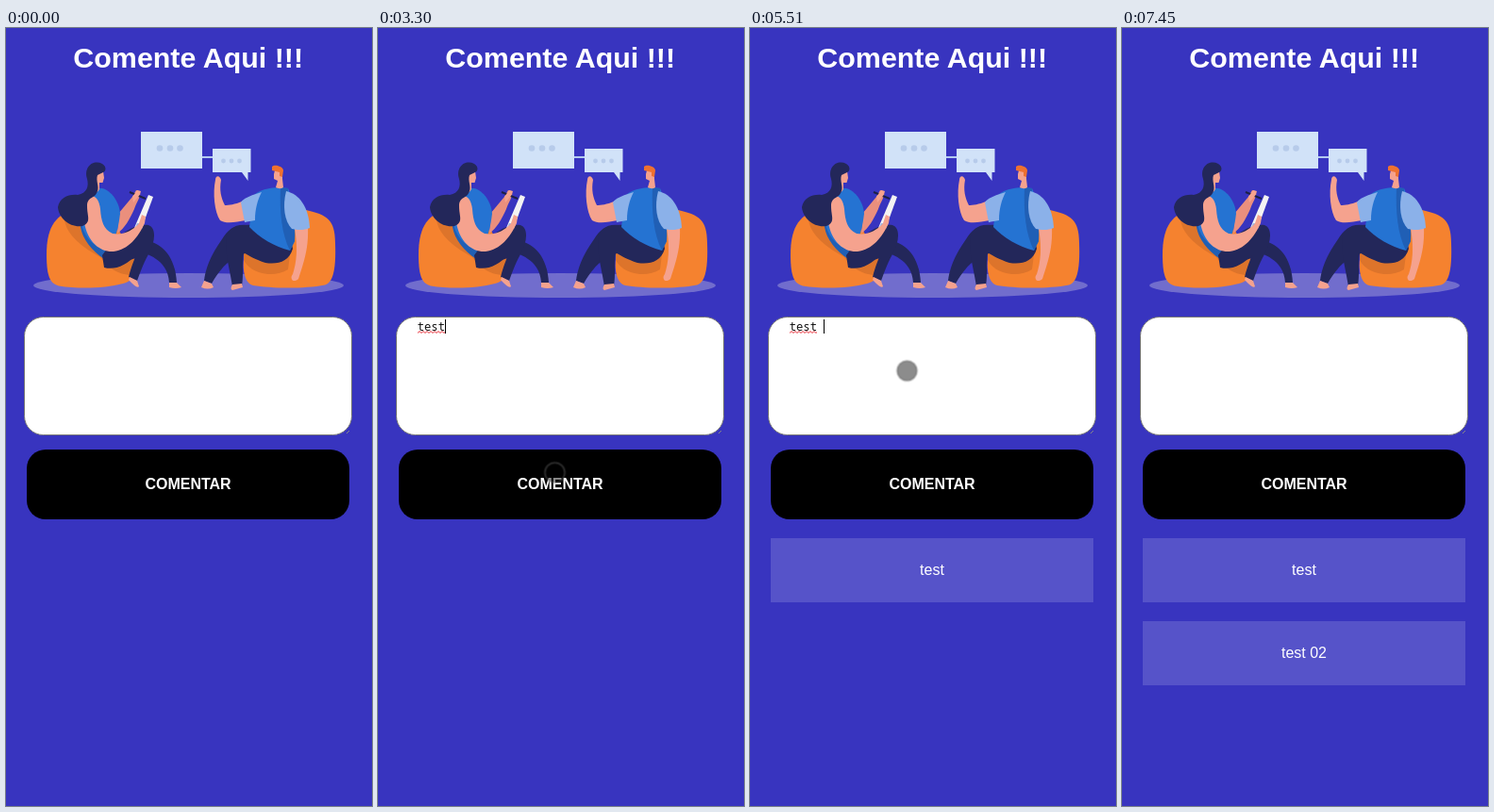
These frames come from a looping animation (388 by 825 pixels, 8.18 s). An HTML page:

```html
<!DOCTYPE html>
<html lang="pt">
<head>
<meta charset="utf-8">
<title>Comente Aqui</title>
<style>
html, body { margin: 0; width: 100%; height: 100%; overflow: hidden; background: #3834bf; }
svg { position: absolute; left: 0; top: 0; display: block; }
svg text { font-family: "Liberation Sans", Arial, sans-serif; font-size: 16px; fill: #fff; text-anchor: middle; }
.bold { font-weight: bold; }
svg .title { font-size: 30.4px; }

.skin { fill: #f5a28e; }
.navy { fill: #23275a; }
.blue { fill: #2573d2; }
.deep { fill: #205fb5; }
.pale { fill: #8bb1e9; }
.orange { fill: #f5822f; }
.shade { fill: #dd742b; }
.note { fill: #d1e2f8; }
.dot { fill: #b7cbea; }

.entry, .caret, .squiggle, .comment, .pointer, .pointer circle {
  animation: 8180ms step-end infinite;
}

.entry {
  position: absolute; left: 41.7px; top: 309px; height: 15px; width: 0;
  font: 12.22px/15px "Noto Sans Mono", "DejaVu Sans Mono", monospace; color: #111;
  animation-name: type;
}
.entry span { display: block; overflow: hidden; white-space: pre; }
.caret { position: absolute; left: 100%; top: 0; width: 1px; height: 15px; background: #000; animation-name: blink; }
@keyframes type {
  0%, 42.77%, 87.02% { width: 0; }
  20.88%, 59.03% { width: 7.333px; }
  22.47%, 60.62% { width: 14.667px; }
  24.19%, 61.47% { width: 22px; }
  25.77%, 63.06% { width: 29.333px; }
  67.34% { width: 36.667px; }
  71.37% { width: 44px; }
  72.96%, 87% { width: 51.333px; }
  100% { width: 0; }
}
@keyframes blink {
  0%, 16.61%, 31.4%, 42.77%, 55.73%, 79.56%, 87.02%, 100% { visibility: hidden; }
  10%, 20.88%, 38%, 48.39%, 59.03%, 85.6% { visibility: visible; }
}

.squiggle { animation-name: spell; }
@keyframes spell {
  0%, 42.77%, 87.02%, 100% { visibility: hidden; }
  34.7%, 67.34% { visibility: visible; }
}

.first { animation-name: first; }
.second { animation-name: second; }
@keyframes first { 0% { visibility: hidden; } 42.77%, 100% { visibility: visible; } }
@keyframes second { 0% { visibility: hidden; } 87.02%, 100% { visibility: visible; } }

.pointer { animation-name: move; }
.pointer circle { fill: rgba(0, 0, 0, .45); stroke: rgba(100, 100, 100, .4); stroke-width: 2; animation-name: press; }
@keyframes move {
  0% { opacity: 0; transform: translate(292px, 717px); }
  .84% { opacity: 1; transform: translate(292px, 717px); animation-timing-function: steps(4); }
  4.12% { transform: translate(170px, 480px); animation-timing-function: steps(4); }
  7.3% { transform: translate(90px, 372px); }
  10% { transform: translate(90px, 372px); animation-timing-function: steps(3); }
  12.57% { transform: translate(102.5px, 370.5px); }
  33.84% { transform: translate(102.5px, 370.5px); animation-timing-function: steps(4); }
  37.14% { transform: translate(148px, 384px); animation-timing-function: steps(4); }
  40.32% { transform: translate(187.5px, 471.5px); }
  42.77% { transform: translate(187.5px, 471.5px); }
  43.5% { transform: translate(154px, 357px); }
  44.36% { transform: translate(126.5px, 336.5px); }
  48.39% { transform: translate(126.5px, 336.5px); animation-timing-function: steps(3); }
  50.96% { transform: translate(166.5px, 363.5px); }
  77% { transform: translate(166.5px, 363.5px); animation-timing-function: steps(3); }
  79.56% { transform: translate(173px, 364px); }
  81.15% { transform: translate(173px, 364px); animation-timing-function: steps(6); }
  86.29% { transform: translate(227px, 490px); }
  87.02% { transform: translate(227px, 490px); animation-timing-function: steps(2); }
  88.73% { transform: translate(320px, 727px); animation-timing-function: steps(2); }
  90.32% { opacity: 1; transform: translate(317px, 806px); }
  91.06%, 100% { opacity: 0; transform: translate(317px, 806px); }
}
@keyframes press {
  0%, 10%, 42.77%, 48.39%, 87.02%, 100% { fill: rgba(0, 0, 0, .45); stroke: rgba(100, 100, 100, .4); }
  8.17%, 41.9%, 45.21%, 86.29% { fill: rgba(255, 255, 0, .5); stroke: rgba(205, 205, 40, .5); }
}
</style>
</head>
<body>
<svg width="388" height="825" viewBox="0 0 388 825">
  <defs>
    <pattern id="wave" x="42" y="321" width="4" height="3" patternUnits="userSpaceOnUse">
      <path d="M-1 1.5L0 2.5L2 .5L4 2.5L5 1.5" fill="none" stroke="#e8202a"/>
    </pattern>
  </defs>

  <text class="title bold" x="193.2" y="42">Comente Aqui !!!</text>

  <ellipse cx="193.5" cy="273" rx="164.5" ry="13" fill="#716dcd"/>

  <!-- speech bubbles -->
  <path d="M207 137H220" stroke="#b4cbf0" stroke-width="2"/>
  <path class="note" d="M143 110H208V149H143ZM219 128H259.500V153H256.500V162L250 153H219Z"/>
  <g class="dot">
    <circle cx="163" cy="127.500" r="3.300"/><circle cx="174" cy="127.500" r="3.300"/><circle cx="184.500" cy="127.500" r="3.300"/>
    <circle cx="230.500" cy="141" r="2.400"/><circle cx="239" cy="141" r="2.400"/><circle cx="247.500" cy="141" r="2.400"/>
  </g>

  <!-- woman -->
  <path class="orange" d="M72 192C50 199 43 215 43 240C43 262 46 271 56 273.500C78 277 105 276 124 271C134 268 141 262 139 250L120 215Z"/>
  <path class="shade" d="M62 203C64 220 82 233 100 243C110 257 122 262 134 262L137 240L90 200Z"/>
  <path d="M119 197L134 179L138 172L142 173C144 178 138 185 136 192C131 203 126 212 118 218Z" fill="#ea8f7d"/>
  <path class="blue" d="M97 170C108 168 120 182 121 197C119 212 117 224 104 242C92 234 82 222 79 208L86 178Z"/>
  <path class="deep" d="M80 208C84 224 95 234 112 238L104 245C91 236 81 224 79 211Z"/>
  <path class="navy" d="M142 224C160 226 179 236 181 270H173C172 255 164 246 150 240L125 248Z"/>
  <path class="navy" d="M102 241C116 222 134 207 151 209C160 212 158 228 151 240C145 251 142 260 139 268L130 264C132 255 136 246 138 240C128 252 115 257 104 254Z"/>
  <path class="skin" d="M131 264L139 268L141 274Q139 277 130 267ZM173 270H181L186 275Q180 277 173 275Z"/>
  <path d="M131 174L148 181" stroke="#1d2046" stroke-width="2"/>
  <path class="skin" d="M134 179L139 172L143 173L141 178L135 185Z"/>
  <path d="M151 177L156 179L145 209L136 212Z" fill="#f4f3f3"/>
  <path class="pale" d="M139 207L146 208L144 213L137 212Z"/>
  <path class="skin" d="M88 179C82 185 81 200 84 211C88 227 100 238 114 237C130 235 140 222 147 207L148 200L144 198L141 207C134 215 125 220 113 218C103 213 101 205 100 192C99 182 94 176 88 179Z"/>
  <path class="skin" d="M94 151L103 152L104 159L102.500 164L99 164L99 171C97 175 93 176 92 175Z"/>
  <path class="navy" d="M86 160C82 148 92 139 102 144C107 147 106 152 103 153L97 156C95 162 99 168 97 173C94 182 86 178 86 189C86 200 91 206 81 210C68 212 56 202 55 190C57 180 66 176 76 177C86 175 88 168 86 160Z"/>

  <!-- man -->
  <path class="orange" d="M318 193C340 198 349 203 349 228C350 255 347 270 338 272.500C315 277 280 276 262 273C252 270 250 255 253 238L300 200Z"/>
  <path class="shade" d="M252 232L302 232L299 256C285 265 260 262 252 246Z"/>
  <path class="navy" d="M260 210C244 206 236 213 229 224C220 237 212 251 210 268L218 271C223 262 230 252 240 245L262 235Z"/>
  <path class="navy" d="M304 234C300 248 288 251 275 249C262 245 255 240 252 238C250 250 252 262 250 273L240 274C237 255 231 235 234 220C237 210 250 208 262 209L302 225Z"/>
  <path class="skin" d="M210 268L218 271L220 275Q214 278 207 275ZM240 272L250 271L251 275L240 278Q237 277 240 272Z"/>
  <path class="blue" d="M262 178C270 170 285 168 299 170C306 185 307 215 306 226L301 236C285 232 268 222 258 211Z"/>
  <path class="deep" d="M291 169L299 170C299 185 298 200 306 215V226L301 236C292 218 290 195 291 169Z"/>
  <path class="skin" d="M222 161C219 175 221 195 227 204C233 208 244 206 254 204L250 184C243 187 236 188 232 188C228 180 226 172 228 161C226 155 222 157 222 161Z"/>
  <path class="pale" d="M271 174C258 178 251 181 249 185L253 206L264 204C264 191 267 182 271 174Z"/>
  <path class="skin" d="M306 212H320C321 235 315 250 310 266C305 271 300 266 304 261C309 245 309 230 306 212Z"/>
  <path class="pale" d="M297 173C311 176 321 190 322 212C315 215 308 214 303 213C295 205 293 188 297 173Z"/>
  <path class="skin" d="M285 151L293 150L293 160L294 169C291 171 288 170 286 169L288 162L284 160V155Z"/>
  <path d="M282 147C285 144 294 147 294 151L293 158L290 157V153L282 151Z" fill="#ef7130"/>

  <!-- form -->
  <rect x="19.500" y="306.500" width="347" height="125" rx="20" fill="#fff" stroke="#767676"/>
  <path d="M361 430L364 427" stroke="#888"/>
  <rect x="22" y="447" width="342" height="74" rx="20"/>
  <text class="bold" x="193" y="489">COMENTAR</text>
  <rect class="squiggle" x="42" y="321" width="29" height="3" fill="url(#wave)"/>

  <g class="comment first">
    <rect x="22" y="541" width="342" height="68" fill="#5653c9"/>
    <text x="193" y="580">test</text>
  </g>
  <g class="comment second">
    <rect x="22" y="629" width="342" height="68" fill="#5653c9"/>
    <text x="193" y="668">test 02</text>
  </g>
</svg>

<div class="entry"><span>test 02</span><i class="caret"></i></div>

<svg width="388" height="825" viewBox="0 0 388 825">
  <g class="pointer"><circle r="10.500"/></g>
</svg>
</body>
</html>
```
